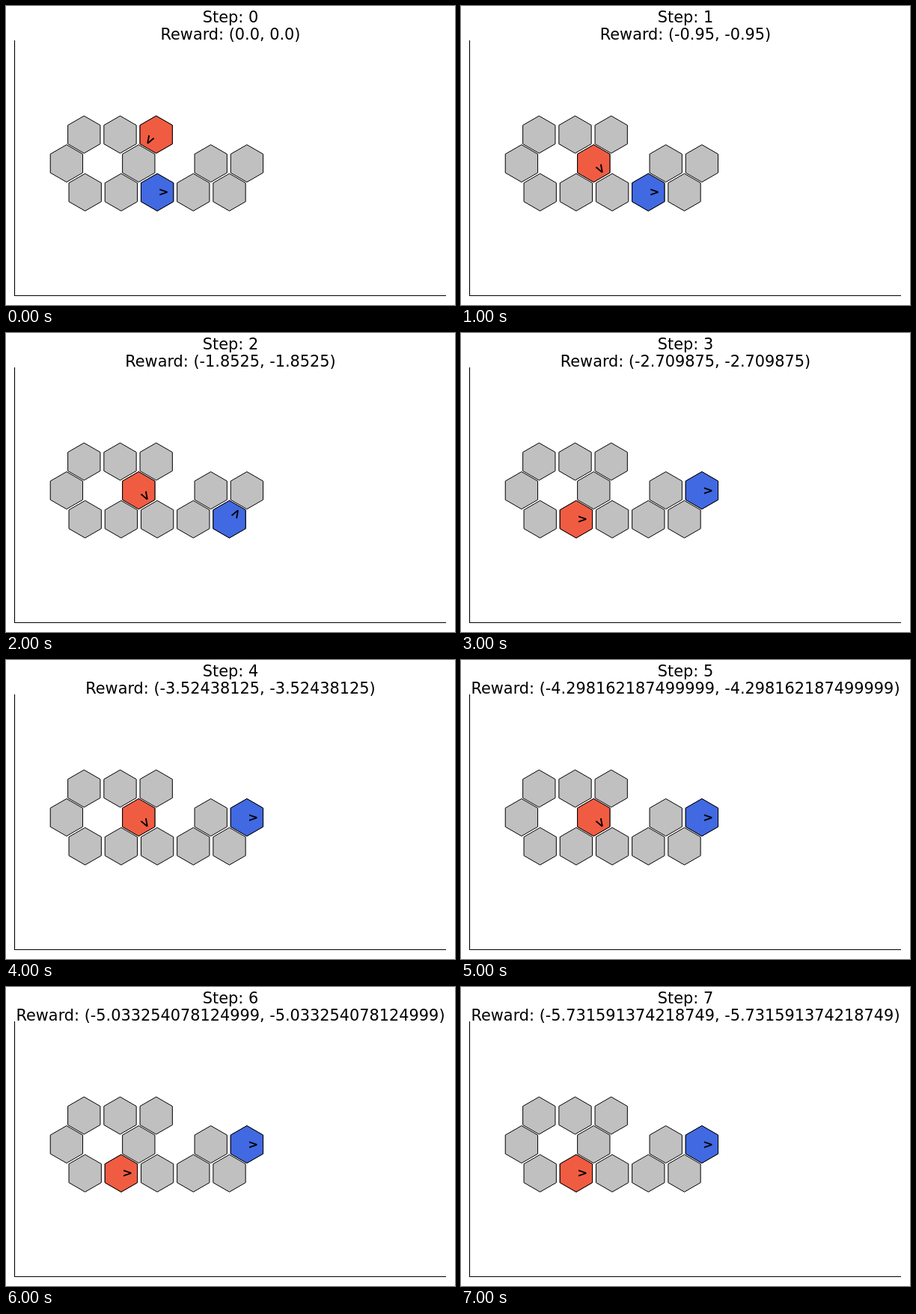
Write an HTML page that moves like this. It is 600x400 px and loops after 8 s.

```html
<!DOCTYPE html>
<html lang="en">
<head>
<meta charset="utf-8">
<style>
  html, body { margin: 0; width: 100%; height: 100%; overflow: hidden; background: #fff; }
  svg { display: block; width: 600px; height: 400px; }
  text { font-family: "DejaVu Sans", sans-serif; text-anchor: middle; }
  .title { font-size: 20.83px; }
  .arrow { font-size: 16.67px; font-weight: bold; }
  .hex { stroke: #000; stroke-width: 1; }
</style>
</head>
<body>
<svg viewBox="0 0 600 400">
  <path d="M11.5 46V387.5H588" fill="none" stroke="#000" stroke-width="1.1"/>
  <text id="step" class="title" x="300" y="22"></text>
  <text id="reward" class="title" x="300" y="45"></text>
  <g id="board"></g>
</svg>
<script>
const STEP_MS = 1000;
const RED = '#f05c42', BLUE = '#4169e1', GREY = '#c0c0c0';

// Cells as [column, row] on a skewed hexagonal grid.
const cells = [[0, 0], [1, 0], [2, 0], [-1, 1], [1, 1], [3, 1], [4, 1],
               [-1, 2], [0, 2], [1, 2], [2, 2], [3, 2]];

const rewards = ['0.0', '-0.95', '-1.8525', '-2.709875', '-3.52438125',
  '-4.298162187499999', '-5.033254078124999', '-5.731591374218749'];

// Poses as [column, row, heading in sixths of a turn], one per step.
const redUpper = [1, 1, 1], redLower = [0, 2, 0], blueEnd = [4, 1, 0];
const redPoses = [[2, 0, 2], redUpper, redUpper, redLower, redUpper, redUpper, redLower, redLower];
const bluePoses = [[1, 2, 0], [2, 2, 0], [3, 2, -1], ...Array(5).fill(blueEnd)];

const byId = id => document.getElementById(id);
const center = ([q, r]) => [104.3 + 48.2 * q + 24.8 * r, 172 + 38.6 * r];

function hex(cell, fill) {
  const [x, y] = center(cell);
  const points = [...Array(6).keys()].map(i => {
    const a = (i + 0.5) * Math.PI / 3;
    return `${x + 25 * Math.cos(a)},${y + 25 * Math.sin(a)}`;
  });
  return `<polygon class="hex" points="${points.join(' ')}" fill="${fill}"/>`;
}

function agent(pose, fill) {
  const [x, y] = center(pose), turn = pose[2];
  const a = turn * Math.PI / 3;
  const dx = turn ? 9 * Math.sign(Math.cos(a)) : 8.3;
  const dy = 7.5 * Math.sign(Math.sin(a));
  return hex(pose, fill) +
    `<text class="arrow" transform="translate(${x + dx} ${y + dy}) rotate(${turn * 60})" y="5.2">&gt;</text>`;
}

let shown = -1;
function draw(now) {
  const step = Math.floor(now / STEP_MS) % rewards.length;
  if (step !== shown) {
    shown = step;
    byId('step').textContent = `Step: ${step}`;
    byId('reward').textContent = `Reward: (${rewards[step]}, ${rewards[step]})`;
    byId('board').innerHTML = cells.map(c => hex(c, GREY)).join('') +
      agent(redPoses[step], RED) + agent(bluePoses[step], BLUE);
  }
  requestAnimationFrame(draw);
}
draw(performance.now());
</script>
</body>
</html>
```
